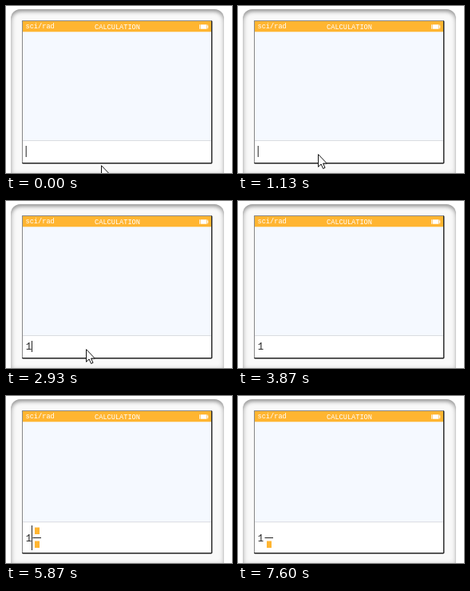
An HTML page for the animation above (8000 ms loop, 283 by 209 pixels).

```html
<!DOCTYPE html>
<html lang="en">
<head>
<meta charset="utf-8">
<title>Calculator</title>
<style>
html, body { margin: 0; width: 100%; height: 100%; overflow: hidden; background: #fff; }
#stage { position: relative; width: 100%; height: 100%; overflow: hidden; contain: strict; }
#case {
  position: absolute; left: 6px; top: 4px; right: 10px; bottom: 0;
  border-radius: 12px 12px 0 0; background: #f9f9f9;
  box-shadow: inset 0 4px 5px -1px #999, inset 3px 0 6px -2px #ccc, inset -3px 0 6px -2px #ddd;
}
svg { position: absolute; left: 0; top: 0; display: block; }
text { font-family: "Liberation Mono", "Noto Sans Mono", monospace; white-space: pre; }
.small { font-size: 8.65px; }
.large { font-size: 12.33px; fill: #222; }
.hint { fill: #a9a9b2; text-anchor: end; }
.mid { text-anchor: middle; }
</style>
</head>
<body>
<div id="stage">
<div id="case"></div>
<svg width="283" height="209" viewBox="0 0 283 209">
  <defs>
    <clipPath id="list"><rect x="41" y="83" width="196" height="113"/></clipPath>
  </defs>

  <rect x="20" y="18" width="238.4" height="179.4" rx="1.5" fill="#222"/>
  <path d="M20.5 196V18.5H257" fill="none" stroke="#888"/>
  <rect x="21" y="19" width="236" height="177" fill="#f5f9ff"/>
  <rect x="21" y="19" width="236" height="13.3" fill="#ffb531"/>
  <g class="small" fill="#fff">
    <text x="24.5" y="28">sci/rad</text>
    <text x="139.5" y="29" class="mid">CALCULATION</text>
    <path d="M242 23.2h.8v5.6h-.8zM243.6 23.2h7.4v5.6h-7.4zM251.6 23.2h.8v5.6h-.8zM252.4 24.6h.8v2.8h-.8z"/>
  </g>

  <g id="field">
    <rect id="input" x="21" width="236" fill="#fff"/>
    <rect id="rule" x="21" width="236" height=".74" fill="#cdd0d6"/>
    <text id="digit" x="24.7" class="large">1</text>
    <g id="fraction">
      <rect x="33.5" y="177" width="10.5" height="1" fill="#222"/>
      <rect id="top" x="36" y="164.5" width="6" height="8.5" fill="#ffb531"/>
      <rect x="36" y="181.5" width="6" height="8.5" fill="#ffb531"/>
    </g>
    <rect id="caret" width="1" fill="#222"/>
  </g>

  <g id="toolbox">
    <rect x="41" y="52" width="196" height="144" fill="#fff"/>
    <g clip-path="url(#list)">
      <text x="47.5" y="86" class="large">factor(n)</text>
      <rect x="41" y="95" width="196" height="43" fill="#d5d6e6"/>
      <path d="M41 138.5h196M41 168.5h196" stroke="#e3e4ec"/>
      <g class="large">
        <text x="47" y="121">1</text>
        <text x="61.5" y="112.5" class="mid">2</text>
        <text x="61.5" y="130" class="mid">3</text>
        <path d="M56 117.5h11" stroke="#222"/>
        <text x="47.2" y="157">rem(p,q)</text>
        <text x="47.2" y="186">quo(p,q)</text>
      </g>
      <g class="small">
        <text x="231" y="120" class="hint">Mixed fraction</text>
        <text x="231" y="155" class="hint">Remainder of p over q</text>
        <text x="231" y="184" class="hint">Quotient of p over q</text>
      </g>
    </g>
    <path d="M41.5 68v128M236.5 68v128" stroke="#e3e4ec"/>
    <rect x="41" y="52" width="196" height="16" fill="#6a6774"/>
    <text x="139.5" y="63" class="small mid" fill="#fff">Toolbox</text>
    <text x="139.5" y="78" class="small mid" fill="#b9b9c0">Arithmetic</text>
  </g>

  <path id="pointer" d="M.5 .7V16.3L4.1 12.9L6.6 18.5L9 17.4L6.5 12H11.3Z" fill="#fff" stroke="#111"/>
</svg>
</div>
<script>
const LOOP = 8000;
const TYPE = 1530, LEAVE = 3130, OPEN = 4400, CLOSE = 5870, ENTER = 6670;
const MOVE = { start: 70, step: 66, count: 6, from: [119, 199], to: [100, 185] };
const caretOn = [[0, 202], [1130, 2000], [2930, 3870], [CLOSE, 7600]];

const el = id => document.getElementById(id);
const set = (id, attrs) => {
  for (const key in attrs) el(id).setAttribute(key, attrs[key]);
};
const show = (id, on) => set(id, { visibility: on ? "visible" : "hidden" });

function caretBox(t) {
  if (t >= ENTER) return { x: 38.4, y: 162, height: 14 };
  if (t >= CLOSE) return { x: 32, y: 162, height: 31 };
  return { x: t < TYPE ? 24.7 : 32, y: 175, height: 14 };
}

function pointerAt(t) {
  const done = Math.floor((t - MOVE.start) / MOVE.step) + 1;
  const k = Math.min(MOVE.count, Math.max(0, done)) / MOVE.count;
  return MOVE.from.map((a, i) => Math.round(a + (MOVE.to[i] - a) * k));
}

function draw(t) {
  const tall = t >= CLOSE;
  const line = tall ? 157.4 : 168;
  set("rule", { y: line });
  set("input", { y: line, height: 196 - line });
  set("digit", { y: tall ? 182 : 186 });
  show("digit", t >= TYPE);
  show("fraction", tall);
  show("top", tall && t < ENTER);
  set("caret", caretBox(t));
  show("caret", caretOn.some(([a, b]) => t >= a && t < b));
  show("toolbox", t >= OPEN && t < CLOSE);
  set("pointer", { transform: `translate(${pointerAt(t)})` });
  show("pointer", t < LEAVE);
}

const begin = performance.now();
function tick() {
  draw((performance.now() - begin) % LOOP);
  requestAnimationFrame(tick);
}
draw(0);
requestAnimationFrame(tick);
</script>
</body>
</html>
```
